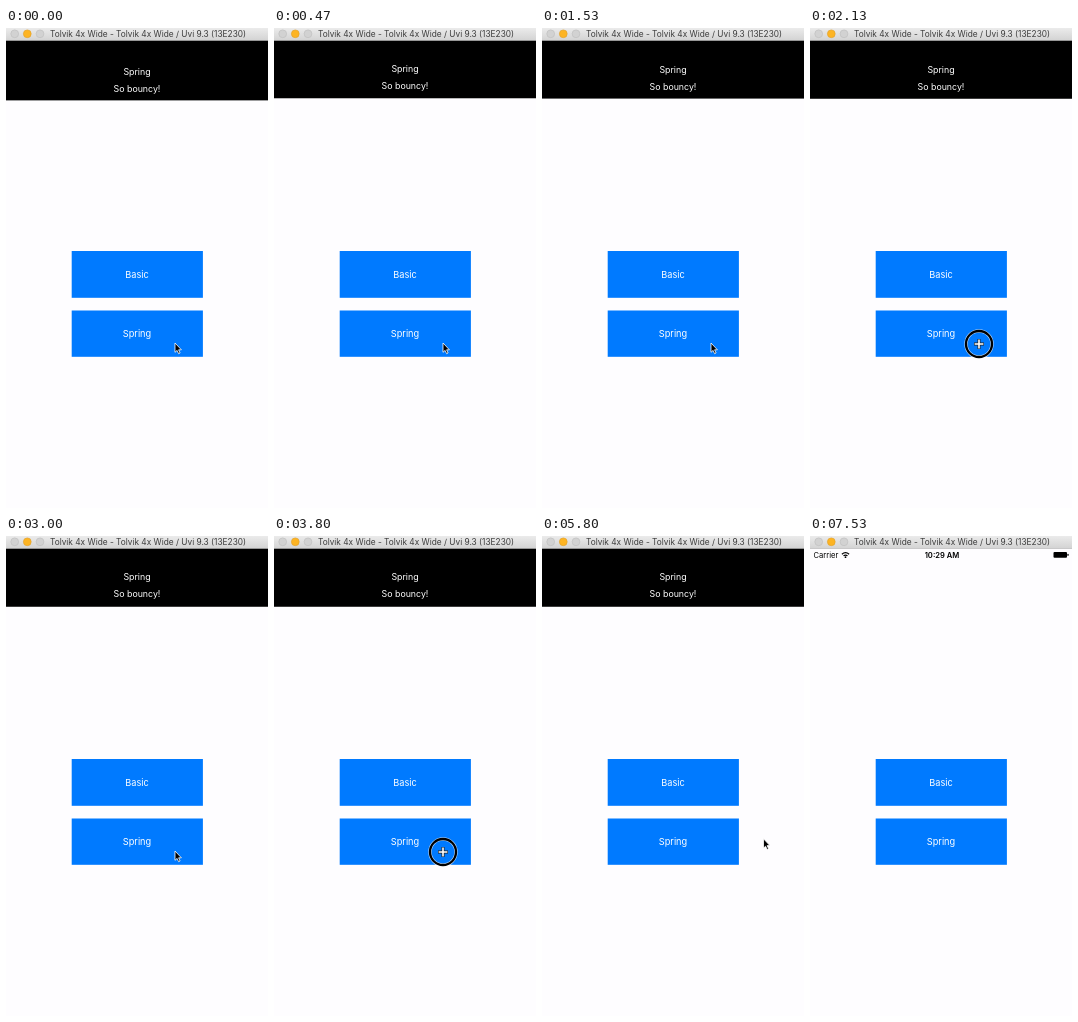
Animation of 262 by 480 pixels, one loop 7.59 s. Source, as an HTML page:

```html
<!DOCTYPE html>
<html lang="en">
<head>
<meta charset="utf-8">
<title>Spring banner</title>
<style>
  html, body { margin: 0; width: 100%; height: 100%; overflow: hidden; background: #fefdff; }
  svg { display: block; width: 262px; height: 480px; }
  text { font-family: Inter, Roboto, "Liberation Sans", sans-serif; text-anchor: middle; }
  .label { font-size: 9.2px; fill: #fff; }
  .note { font-size: 8.8px; fill: #fff; }
  .status { font-size: 7.6px; fill: #000; }
</style>
</head>
<body>
<svg viewBox="0 0 262 480">
  <defs>
    <linearGradient id="chrome" x2="0" y2="1">
      <stop stop-color="#ebebeb"/>
      <stop offset="1" stop-color="#d3d3d3"/>
    </linearGradient>
    <g id="banner">
      <rect y="-70" width="262" height="140"/>
      <text class="note" x="131" y="44.2">Spring</text>
      <text class="note" x="131" y="61.2">So bouncy!</text>
    </g>
  </defs>

  <rect width="262" height="480" fill="#fefdff"/>

  <g id="status">
    <text class="status" x="3.5" y="22" style="text-anchor:start">Carrier</text>
    <g fill="none" stroke="#000" stroke-width="1.2">
      <path d="M31.9 18.2Q35.5 14.9 39.1 18.2M33.5 19.9Q35.5 18.2 37.5 19.9"/>
    </g>
    <circle cx="35.5" cy="21.2" r=".9"/>
    <text class="status" x="132" y="22" font-weight="600">10:29 AM</text>
    <rect x="243.5" y="16" width="13.5" height="5.8" rx="1"/>
    <rect x="257.5" y="17.8" width="1" height="2.2" rx=".5"/>
  </g>

  <g fill="#007aff">
    <rect x="65.7" y="223" width="131.2" height="46.8"/>
    <rect x="65.7" y="282.5" width="131.2" height="46.3"/>
  </g>
  <text class="label" x="131" y="249.8">Basic</text>
  <text class="label" id="springLabel" x="131" y="309.3">Spring</text>

  <g id="stack"></g>

  <rect width="262" height="12.5" fill="url(#chrome)"/>
  <rect y="12" width="262" height=".6" fill="#b4b4b4"/>
  <g stroke-width=".6">
    <circle cx="8.7" cy="5.8" r="3.9" fill="#d2d2d2" stroke="#bdbdbd"/>
    <circle cx="21.3" cy="5.8" r="3.9" fill="#fdb423" stroke="#e0a02a"/>
    <circle cx="34" cy="5.8" r="3.9" fill="#d2d2d2" stroke="#bdbdbd"/>
  </g>
  <text x="142" y="9" font-size="8.3" fill="#3c3c3c">Tolvik 4x Wide - Tolvik 4x Wide / Uvi 9.3 (13E230)</text>

  <path id="arrow" d="M0 0V9.3L2.1 7.4L3.6 10.7L5.1 10L3.6 6.8H6.4Z" stroke="#fff" stroke-width=".8"/>
  <g id="press" transform="translate(169 316)" fill="none">
    <circle r="13" stroke="#fff" stroke-opacity=".7" stroke-width="3.4"/>
    <circle r="13" stroke="#000" stroke-width="2.3"/>
    <path d="M-5 0H5M0 -5V5" stroke="#222" stroke-width="3"/>
    <path d="M-4.4 0H4.4M0 -4.4V4.4" stroke="#fff" stroke-width="1.6"/>
  </g>
</svg>
<script>
const LOOP = 7590;
const STEP = 200 / 3;
const HEIGHT = 70;
const DISMISS = [5930, 6250];

// Each banner drops when its press is released.
const banners = [
  { at: -9000, rest: 0 },
  { at: -258, rest: 0.4 },
  { at: 866, rest: 0.6 },
  { at: 2250, rest: 0 },
  { at: 3945, rest: 0 }
];
const presses = [[690, 866], [2110, 2250], [3790, 3945]];
const pointerPath = [
  [0, 169, 315],
  [4930, 169, 315],
  [5500, 221.5, 302.8],
  [6550, 221.5, 302.8],
  [7050, 268, 304]
];

const $ = id => document.getElementById(id);
const clamp = v => Math.min(1, Math.max(0, v));
const ease = v => v * v * (3 - 2 * v);
const move = (el, x, y) => el.setAttribute("transform", `translate(${x} ${y})`);
const show = (el, on) => el.setAttribute("visibility", on ? "visible" : "hidden");

for (const b of banners) {
  b.el = document.createElementNS("http://www.w3.org/2000/svg", "use");
  b.el.setAttribute("href", "#banner");
  $("stack").append(b.el);
}

// Underdamped step response: -HEIGHT at the start, 0 at rest.
function spring(ms) {
  const w = 19, decay = 8.3, s = ms / 1000;
  return -HEIGHT * Math.exp(-decay * s) * (Math.cos(w * s) + decay / w * Math.sin(w * s));
}

function pointerAt(t) {
  let i = 0;
  while (i < pointerPath.length - 2 && t >= pointerPath[i + 1][0]) i++;
  const [t0, x0, y0] = pointerPath[i];
  const [t1, x1, y1] = pointerPath[i + 1];
  const k = ease(clamp((t - t0) / (t1 - t0)));
  return [x0 + (x1 - x0) * k, y0 + (y1 - y0) * k];
}

function labelAlpha(t) {
  let alpha = 1;
  for (const [down, up] of presses) {
    if (t >= down + 40) alpha = 0.2 + 0.8 * clamp((t - up - 40) / 300);
  }
  return alpha;
}

function draw(t) {
  for (const b of banners) {
    show(b.el, t >= b.at);
    if (t >= b.at) move(b.el, 0, b.rest + spring(t - b.at));
  }
  const [from, to] = DISMISS;
  move($("stack"), 0, -HEIGHT * ease(clamp((t - from) / (to - from))));

  const pressed = presses.some(([down, up]) => t >= down && t < up);
  show($("press"), pressed);
  show($("arrow"), !pressed);
  move($("arrow"), ...pointerAt(t));
  $("springLabel").setAttribute("opacity", labelAlpha(t));
}

const start = performance.now();
function tick() {
  const t = (performance.now() - start) % LOOP;
  draw(Math.floor((t + 3.4) / STEP) * STEP);
  requestAnimationFrame(tick);
}
tick();
</script>
</body>
</html>
```
